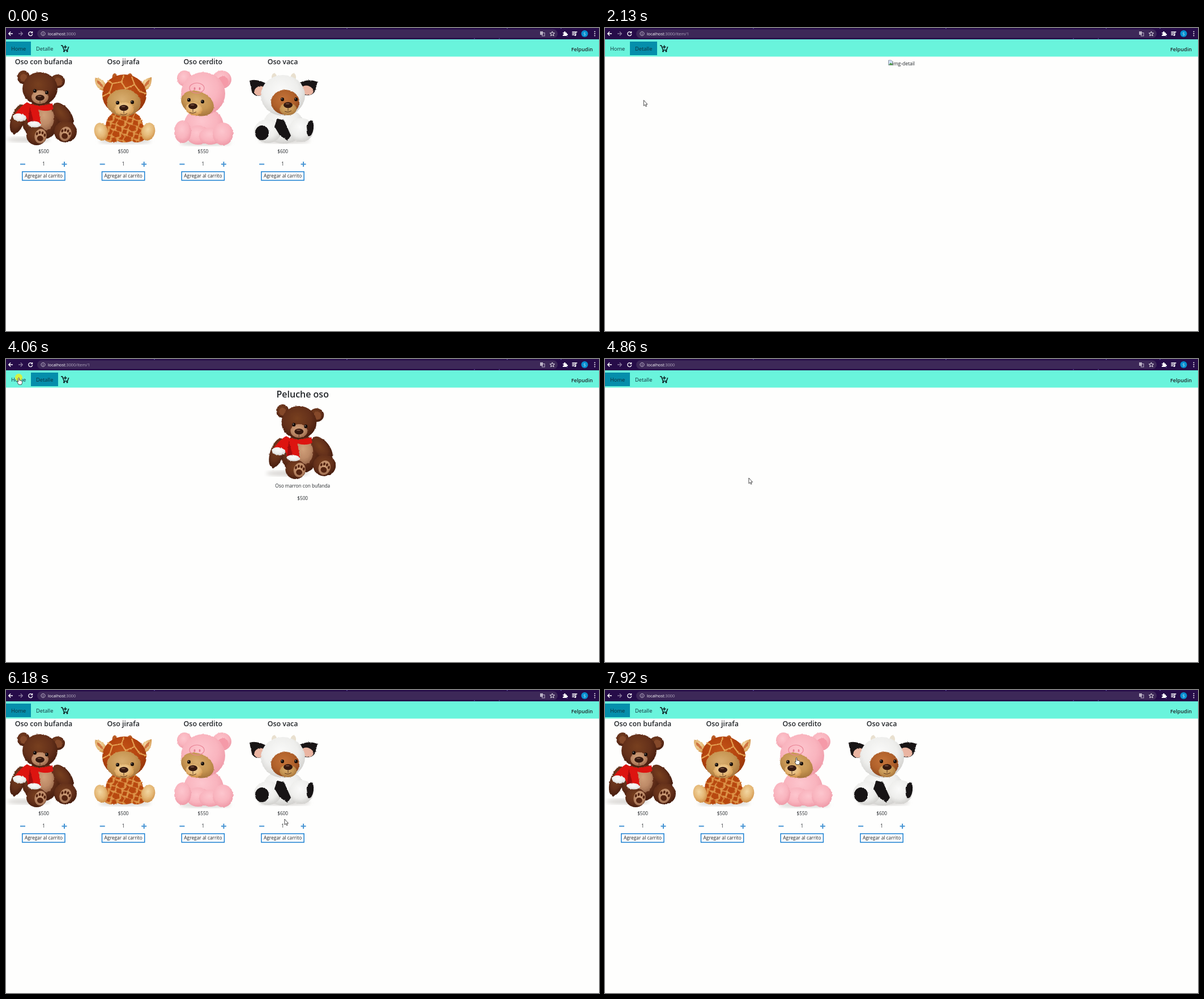
An HTML page for the animation above (7.99 s loop, 1047 by 535 pixels).

```html
<!DOCTYPE html>
<html lang="es">
<head>
<meta charset="utf-8">
<title>Tienda de osos</title>
<style>
  html, body { margin: 0; width: 100%; height: 100%; overflow: hidden; background: #fefefd; }
  svg { display: block; width: 100%; height: 100%; font-family: "Open Sans", "Noto Sans", sans-serif; fill: #212529; }
  .mid { text-anchor: middle; }
  .line { fill: none; stroke: #fff; stroke-width: 1.3; }
</style>
</head>
<body>
<svg id="stage" viewBox="0 0 1047 535"></svg>
<script>
const FRAME = 7990 / 120;

// ---------- drawing helpers ----------
const oval = (x, y, rx, ry, fill, turn = 0) =>
  `<ellipse cx="${x}" cy="${y}" rx="${rx}" ry="${ry}" fill="${fill}" transform="rotate(${turn} ${x} ${y})"/>`;
const shape = (d, fill) => `<path d="${d}" fill="${fill}"/>`;
const line = (d, more = '') => `<path class="line" d="${d}" ${more}/>`;
const text = (x, y, size, str, more = '') =>
  `<text x="${x}" y="${y}" font-size="${size}" ${more}>${str}</text>`;
const mid = (x, y, size, str, weight = 400) =>
  text(x, y, size, str, `class="mid" font-weight="${weight}"`);
const fur = parts => `<g filter="url(#fur)">${parts}</g>`;
const eye = (x, y) => oval(x, y, 3, 3.2, '#160c08') + oval(x - 1, y - 1, .8, .8, '#ddd');
const nose = (x, y) => oval(x, y, 8, 5.3, '#35190f') + oval(x - 1, y - 2.2, 3.5, 1, '#77503f') +
  `<path d="M${x} ${y + 5}v5m-6 1q6 3 12-1" fill="none" stroke="#4b2a19" stroke-width=".9"/>`;
const ball = (id, light, main, dark) =>
  `<radialGradient id="${id}" cx=".45" cy=".38" r=".65"><stop stop-color="${light}"/>
   <stop offset=".6" stop-color="${main}"/><stop offset="1" stop-color="${dark}"/></radialGradient>`;

const defs = `<defs>
  ${ball('brown', '#78401f', '#64301a', '#431b0d')}
  ${ball('tan', '#d0a07a', '#bd8a67', '#98674a')}
  ${ball('gold', '#d8ae70', '#c69552', '#a3713a')}
  ${ball('cream', '#f3d8a4', '#e4b674', '#cd8c43')}
  ${ball('ember', '#c4561a', '#b4430e', '#93350a')}
  ${ball('pink', '#fdc6ce', '#f9b4be', '#ee98a6')}
  ${ball('white', '#fafaf9', '#eeeeec', '#cfcecb')}
  ${ball('rust', '#c4743a', '#b0602a', '#8a451c')}
  <pattern id="spots" width="25" height="24" patternUnits="userSpaceOnUse" patternTransform="rotate(24) scale(.9)">
    <rect width="25" height="24" fill="#dd9448"/>
    <path d="M0 2L11 0L15 8L8 13L0 11ZM16 1L24 3L23 12L15 14L18 7ZM2 15L11 14L15 22L4 24ZM16 16L24 14L25 22L17 24Z" fill="#b8480f"/>
  </pattern>
  <filter id="fur" x="-10%" y="-10%" width="120%" height="120%" color-interpolation-filters="sRGB">
    <feTurbulence type="fractalNoise" baseFrequency=".3" numOctaves="2" seed="4"/>
    <feDisplacementMap in="SourceGraphic" scale="2.5" xChannelSelector="R" yChannelSelector="G"/>
    <feGaussianBlur stdDeviation=".4"/>
  </filter>
  <filter id="soft"><feGaussianBlur stdDeviation="3"/></filter>
</defs>`;

const shadow = (x, y, rx) => `<g filter="url(#soft)">${oval(x, y, rx, 5, '#d9d7d4')}</g>`;

// ---------- plush toys ----------
const paw = (x, y, turn) => `<g transform="translate(${x} ${y}) rotate(${turn})">
  ${oval(0, 0, 10.5, 13, 'url(#tan)')}${oval(0, 4, 5.5, 5, '#552411')}
  ${[-7, -2.5, 2.5, 7].map(a => oval(a, Math.abs(a) * .7 - 8, 1.9, 2.8, '#552411')).join('')}</g>`;

const scarfBear = shadow(40, 197, 38) + fur(
  oval(31, 87, 11, 12, 'url(#brown)') + oval(31, 88, 6, 7, '#85492a') +
  oval(91, 94, 13, 12, 'url(#brown)') + oval(92, 95, 7, 7, '#85492a') +
  oval(62, 163, 34, 34, 'url(#brown)') +
  oval(21, 161, 12, 27, 'url(#brown)', 18) + oval(101, 153, 13, 25, 'url(#brown)', -38) +
  oval(69, 159, 16, 22, 'url(#tan)') +
  oval(60, 107, 31, 29, 'url(#brown)') + oval(60, 122, 15, 12, 'url(#tan)') +
  oval(54, 190, 18, 17, 'url(#brown)') + oval(105, 183, 20, 19, 'url(#brown)') +
  shape('M37 131Q55 142 82 133L83 143Q72 149 57 144L62 169L39 167L37 160L15 153Q24 139 37 131Z', '#dd1410') +
  shape('M42 139L49 166L39 166Z', '#a40b0c') +
  oval(24, 158, 12, 7, 'url(#white)', 8) + oval(50, 170, 12, 5.5, 'url(#white)', 5)) +
  paw(61, 191, 10) + paw(105, 187, 20) +
  eye(51, 111) + eye(72, 114) + nose(60, 123);

const giraffe = shadow(210, 200, 46) + fur(
  oval(192, 87, 4.5, 7, '#b95c25') + oval(219, 87, 4.5, 7, '#b95c25') +
  shape('M157 88Q171 88 177 101L171 111Q156 105 157 88Z', 'url(#cream)') +
  shape('M257 87Q243 89 238 100L244 111Q258 106 257 87Z', 'url(#cream)') +
  shape('M160 92Q169 94 172 105Q162 102 160 92ZM254 91Q246 94 243 105Q252 102 254 91Z', '#cf7440') +
  oval(209, 173, 33, 29, 'url(#spots)') +
  oval(209, 118, 39, 36, 'url(#ember)') +
  `<path d="M170 121L183 114L188 98L179 93M188 98L204 95L208 83M204 95L211 107L227 100L222 86
    M227 100L236 112L248 116M183 114L186 124M211 107V112" fill="none" stroke="#e3a052" stroke-width="2.2"/>` +
  oval(208, 132, 30, 24, 'url(#gold)') + oval(209, 143, 17, 12, 'url(#cream)') +
  oval(187, 185, 19, 17, 'url(#spots)') + oval(231, 185, 19, 17, 'url(#spots)') +
  oval(168, 183, 12, 16, 'url(#cream)', -15) + oval(251, 183, 12, 16, 'url(#cream)', 15)) +
  eye(197, 132) + eye(223, 131) + nose(208, 141);

const pig = shadow(352, 203, 45) + fur(
  oval(315, 89, 13, 14, 'url(#pink)') + oval(381, 91, 17, 16, 'url(#pink)') +
  oval(383, 95, 10, 10, '#f59aa8') +
  oval(349, 172, 35, 32, 'url(#pink)') + oval(348, 116, 39, 38, 'url(#pink)') +
  oval(338, 133, 30, 21, 'url(#gold)', 22) + oval(332, 143, 15, 11, 'url(#cream)', 15) +
  oval(339, 189, 21, 17, 'url(#pink)') + oval(361, 191, 20, 15, 'url(#pink)') +
  oval(312, 183, 15, 20, 'url(#pink)') + oval(383, 187, 18, 20, 'url(#pink)')) +
  '<ellipse cx="337" cy="106" rx="13" ry="9" fill="none" stroke="#e98395" stroke-width="1.2"/>' +
  oval(333, 107, 1.5, 2.5, '#e58093') + oval(342, 107, 1.5, 2.5, '#e58093') +
  eye(323, 127) + eye(347, 130) + nose(330, 138);

const cow = shadow(492, 199, 45) + fur(
  oval(474, 88, 5, 8, '#e9e0cf', -8) + oval(507, 88, 5, 8, '#e9e0cf', 8) +
  shape('M430 93Q443 89 461 99L455 117Q440 125 434 112Z', '#191516') +
  shape('M550 95Q532 88 514 99L522 116Q538 124 546 111Z', '#191516') +
  oval(448, 111, 10, 8, '#eab5a2', -25) + oval(532, 110, 11, 8, '#eab5a2', 20) +
  oval(490, 173, 37, 31, 'url(#white)') + oval(489, 119, 39, 36, 'url(#white)') +
  oval(493, 131, 25, 22, 'url(#rust)') + oval(498, 143, 15, 11, 'url(#gold)') +
  oval(462, 182, 24, 21, 'url(#white)') + oval(521, 180, 22, 21, 'url(#white)') +
  oval(452, 185, 12, 13, '#171415') + oval(537, 177, 6, 14, '#171415', 8) +
  shape('M479 160L491 163L503 190L497 199L483 189L474 174Z', '#171415')) +
  eye(488, 126) + eye(512, 126) + nose(498, 136);

// ---------- browser and navigation ----------
const chrome = `<rect width="1047" height="20" fill="#260c49"/>
  <rect x="55" y="2.5" width="919" height="15" rx="7.5" fill="#3d2858"/>
  ${[[261, 0], [601, 0], [884, 0], [979, 0], [826, 18], [870, 18], [990, 14]].map(([x, y]) =>
    `<rect x="${x}" y="${y}" width="2" height="1.2" fill="#5a4c9c"/>`).join('')}
  ${line('M12 10H5M8.2 6.5L4.7 10L8.2 13.5')}
  ${line('M22 10H29M25.8 6.5L29.3 10L25.8 13.5', 'opacity=".45"')}
  ${line('M45.7 7.6A3.5 3.5 0 1 0 46.8 10.5M46.6 6V8.7H43.8')}
  ${line('M65.5 6.5a3.5 3.5 0 1 0 .01 0M65.5 9.5V12M65.5 8v.8', 'style="stroke:#d5cfdd;stroke-width:.9"')}
  <g fill="#b9b0c4"><rect x="943" y="6" width="5" height="6"/>
    <rect x="946.5" y="8.5" width="4.5" height="5.5" fill="none" stroke="#b9b0c4"/></g>
  ${line('M964.5 6l1.2 2.8 3 .2-2.3 1.9.8 3-2.7-1.7-2.7 1.7.8-3-2.3-1.9 3-.2Z', 'style="stroke-width:.9"')}
  ${shape('M983 8h2.2a1.4 1.4 0 1 1 2.6 0H990v2.2a1.4 1.4 0 1 1 0 2.4V14H983V11.8a1.3 1.3 0 1 0 0-2.4Z', '#fff')}
  ${line('M999.5 7H1007M999.5 9.5H1005M999.5 12H1003M1006 12.5V7H1008.5')}${oval(1005, 12.6, 1.5, 1.5, '#fff')}
  ${oval(1021.6, 10, 6, 6, '#078fd0')}
  ${text(1021.6, 12.5, 7, 'S', 'class="mid" fill="#fff"')}
  ${[6.5, 10, 13.5].map(y => oval(1039.5, y, 1, 1, '#fff')).join('')}
  <text x="74" y="12.7" font-size="7.3" fill="#fff">localhost<tspan fill="#b1a8bd">:3000<tspan id="path"></tspan></tspan></text>`;

const nav = `<rect y="20" width="1047" height="30.5" fill="#69f4dc"/>
  <rect id="tab" y="24" height="24" fill="#058eab"/>
  <g fill="#10303a">${text(9, 39.5, 9.3, 'Home')}${text(53, 39.5, 9.3, 'Detalle')}</g>
  <path d="M97 31h2.5l3 8h6l2.3-6M104.6 30.5v6M101.6 33.5h6" fill="none" stroke="#08191c" stroke-width="1.5"/>
  ${oval(102.5, 41, 1.5, 1.5, '#08191c')}${oval(108, 41, 1.5, 1.5, '#08191c')}
  ${text(1036, 40.7, 9.1, 'Felpudin', 'text-anchor="end" font-weight="600"')}`;

// ---------- pages ----------
const card = ([name, price], i) => {
  const x = 66.5 + i * 140.7;
  return `${mid(x, 63.8, 12.4, name, 600)}${mid(x, 220.8, 8.2, '$' + price)}${mid(x, 243, 8.2, 1)}
    <path d="M${x - 41.5} 240.5h9M${x + 32} 240.5h9M${x + 36.5} 236v9" stroke="#4594d4" stroke-width="2"/>
    <rect x="${x - 37.7}" y="253.7" width="75.2" height="15.2" fill="#fff" stroke="#1b80d2" stroke-width="1.5"/>
    ${mid(x, 264.4, 8.4, 'Agregar al carrito')}`;
};
const products = [['Oso con bufanda', 500], ['Oso jirafa', 500], ['Oso cerdito', 550], ['Oso vaca', 600]];

const pages = `
  <g id="cards">${products.map(card).join('')}</g>
  <g id="toys">${scarfBear}${giraffe}${pig}${cow}</g>
  <g id="broken">
    <path d="M500.5 57h5l2 2v6.5h-7Z" fill="#cfe0f6" stroke="#7d8790" stroke-width=".8"/>
    <path d="M501 65l3-3.5 3.5 2V65.5Z" fill="#4d9a45"/>
    ${text(507.5, 66, 8.5, 'img-detail')}
  </g>
  <g id="detail">
    ${mid(523.7, 68, 16, 'Peluche oso', 600)}
    <g transform="translate(457.3 5)">${scarfBear}</g>
    ${mid(523.7, 226.8, 8.25, 'Oso marron con bufanda')}${mid(523.7, 248.5, 8.2, '$500')}
  </g>`;

const pointer = `<g id="pointer" fill="#fff" stroke="#222" stroke-width=".8" stroke-linejoin="round">
  <circle id="glow" r="6.5" fill="#e8ee2c" fill-opacity=".85" stroke="none"/>
  <path id="arrow" d="M.4 .5V10.3L2.5 8.4 4.1 11.7 5.6 11 4.1 7.8H7Z"/>
  <path id="hand" d="M-1 1.3Q0-.3 1 1.3V5L4.6 5.8Q6 6.2 6 7.8V10L4.8 12.7H-.2L-2.8 8.2Q-2.8 6.5-1 7.9Z"/>
</g>`;

document.getElementById('stage').innerHTML = defs + pages + chrome + nav + pointer;

// ---------- motion: [step, x, y] ----------
const track = [
  [8, 1035, 523], [9, 900, 465], [10, 715, 372], [11, 626, 327], [13, 626, 327],
  [14, 540, 305], [15, 350, 255], [16, 196, 208], [17, 140, 172], [18, 100, 148], [20, 68, 127],
  [47, 68, 127], [50, 74, 92], [53, 55, 55], [56, 20, 26], [58, 22.5, 32.5],
  [67, 22.5, 32.5], [70, 145, 130], [73, 253.5, 209.5], [77, 253.5, 209.5],
  [80, 310, 60], [82, 420, 8], [84, 560, 90], [87, 520, 263], [90, 491.5, 227.5],
  [96, 491.5, 227.5], [100, 830, 100], [103, 1023, 33], [105, 1023, 33],
  [109, 740, 105], [113, 440, 135], [117, 524, 128], [119, 338, 119]
];

function pointerAt(n) {
  const i = track.findIndex(k => k[0] >= n);
  if (i < 1) return track[0].slice(1);
  const [n0, x0, y0] = track[i - 1], [n1, x1, y1] = track[i];
  const p = (n - n0) / (n1 - n0);
  return [x0 + (x1 - x0) * p, y0 + (y1 - y0) * p];
}

const el = id => document.getElementById(id);
const show = (id, on) => el(id).style.display = on ? '' : 'none';

function draw(n) {
  const onDetail = n >= 32 && n < 63;
  const cards = n < 32 || n >= 91, toys = n < 32 || n >= 92;
  show('cards', cards);
  show('toys', toys);
  show('broken', n === 32);
  show('detail', onDetail && n > 32);
  el('path').textContent = onDetail ? '/item/1' : '';
  el('tab').setAttribute('x', onDetail ? 44 : 0);
  el('tab').setAttribute('width', onDetail ? 48 : 44);

  const [x, y] = pointerAt(n);
  const overLink = y > 24 && y < 48 && x < 112;
  const overToy = toys && y > 72 && y < 213 && x < 556;
  show('pointer', n >= 8);
  show('hand', overLink || overToy);
  show('arrow', !overLink && !overToy);
  show('glow', n === 31 || n === 61 || n === 62);
  el('pointer').setAttribute('transform', `translate(${x} ${y})`);
}

let last = -1;
function tick() {
  const n = Math.floor((performance.now() % 7990 + 15) / FRAME) % 120;
  if (n !== last) draw(last = n);
  requestAnimationFrame(tick);
}
tick();
</script>
</body>
</html>
```
